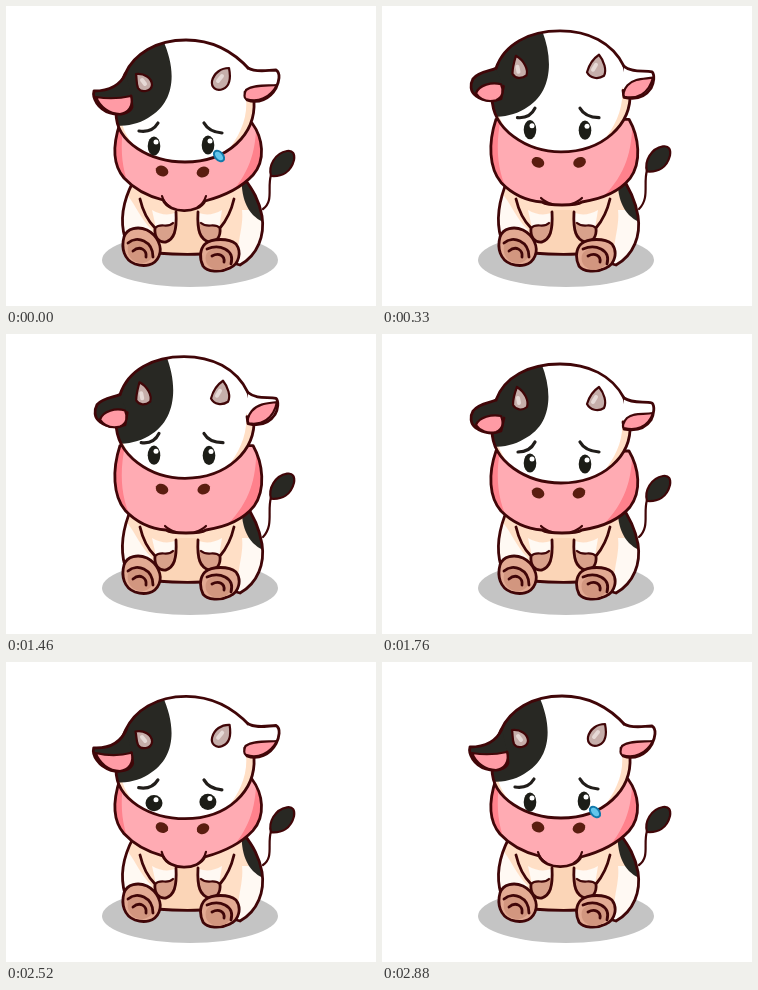
Write an HTML page that moves like this. It is 370 by 300 pixels and loops after 2.94 s.

```html
<!DOCTYPE html>
<html lang="en">
<head>
<meta charset="utf-8">
<title>Sad calf</title>
<style>
html, body { margin: 0; width: 100%; height: 100%; overflow: hidden; background: #fff; }
svg { display: block; width: 370px; height: 300px; }
.ln { stroke: #400608; stroke-width: 2.8; stroke-linecap: round; stroke-linejoin: round; }
.thin { stroke-width: 2.2; }
.no { fill: none; }
</style>
</head>
<body>
<svg viewBox="0 0 370 300">
  <defs>
    <clipPath id="headClip"><path id="headMask"/></clipPath>
    <clipPath id="snoutClip"><path id="snoutMask"/></clipPath>
    <clipPath id="bodyClip"><path id="bodyMask"/></clipPath>
  </defs>
  <ellipse cx="184" cy="254" rx="88" ry="27" fill="#c4c4c4"/>

  <path id="tail" class="ln no thin"/>
  <path id="tuft" class="ln thin" fill="#282823"/>

  <path id="body" fill="#ffdfc6"/>
  <g clip-path="url(#bodyClip)">
    <path d="M110 190H122C130 200 134 212 146 224L120 238H110Z" fill="#fff9f3"/>
    <path d="M146 204Q158 211 169 207V220L150 222Z" fill="#fff9f3"/>
    <path d="M216 204Q204 211 193 207V220L213 222Z" fill="#fff9f3"/>
    <path d="M236 204C238 222 230 234 232 262H262V204Z" fill="#fff9f3"/>
    <path d="M170 204H192V226L203 240V252H146V240L170 226Z" fill="#fbd5b7"/>
    <path d="M236 165C234 190 240 209 259 217L266 170Z" fill="#282823"/>
  </g>
  <path id="bodyLine" class="ln no"/>

  <path d="M148 222C155 216 162 223 170 215V226C169 234 161 238 155 235C150 232 148 227 148 222Z" fill="#d9a18b"/>
  <path d="M215 222C208 216 201 223 192 215V226C193 234 201 238 208 235C213 232 215 227 215 222Z" fill="#d9a18b"/>
  <g class="ln no">
    <path d="M134 193C137 206 142 215 149 222C148 231 153 237 160 236C168 233 171 225 170 206"/>
    <path d="M228 193C225 206 220 215 214 222C215 231 210 237 203 236C194 233 191 225 192 206"/>
    <path class="thin" d="M149 222C155 216 161 223 167 217M214 222C208 216 202 223 195 217"/>
  </g>

  <g class="ln">
    <path d="M118 231C121 222 132 220 141 224C151 229 157 241 153 250C149 260 138 261 129 258C118 254 115 242 118 231Z" fill="#e3aa93"/>
    <path d="M122 240C125 231 139 231 145 239C150 248 146 255 138 257C127 258 120 250 122 240Z" fill="#d2967f" stroke="none"/>
    <path class="no" d="M122 237C131 229 147 235 147 251M127 245C134 239 141 244 140 251"/>
    <path d="M199 238C206 232 223 232 230 238C236 246 233 258 224 262C214 267 201 266 197 260C193 252 194 243 199 238Z" fill="#e3aa93"/>
    <path d="M200 249C203 241 218 240 224 247C228 255 223 262 214 264C203 264 198 257 200 249Z" fill="#d2967f" stroke="none"/>
    <path class="no" d="M201 243C213 238 229 243 225 258M206 250C213 246 219 250 218 256"/>
  </g>

  <path id="snout" fill="#ffabb3"/>
  <g clip-path="url(#snoutClip)" fill="#ff818c">
    <path d="M100 100H122C112 135 114 165 128 190H100Z"/>
    <path d="M270 100H250C252 140 246 165 222 190H270Z"/>
  </g>
  <path id="snoutLine" class="ln no"/>
  <path id="mouth" class="ln no thin"/>
  <ellipse id="nose0" rx="6.5" ry="5.2" fill="#5a1d10"/>
  <ellipse id="nose1" rx="6.5" ry="5.2" fill="#5a1d10"/>

  <path id="head" fill="#fff"/>
  <g clip-path="url(#headClip)">
    <path id="shadeL" fill="#ffdfc6"/>
    <path id="shadeR" fill="#ffdfc6"/>
    <path id="patch" fill="#282823"/>
  </g>
  <path id="headLine" class="ln no"/>
  <path id="earL" class="ln" fill="#282823"/>
  <path id="innerL" class="ln thin" fill="#ff9ba5"/>
  <path id="earR" class="ln" fill="#fff"/>
  <path id="innerR" class="ln thin" fill="#ff9ba5"/>
  <path id="hornL" class="ln thin" fill="#c6aeaa"/>
  <path id="hornR" class="ln thin" fill="#c6aeaa"/>
  <path id="shine" class="no" stroke="#e6d9d6" stroke-width="4" stroke-linecap="round"/>
  <path id="brows" class="no" stroke="#211d1a" stroke-width="3.2" stroke-linecap="round"/>
  <g id="eye0"></g>
  <g id="eye1"></g>
  <g id="tear">
    <ellipse rx="4" ry="6.2" fill="#62c6ec" stroke="#1279aa" stroke-width="2" transform="rotate(-42)"/>
  </g>
</svg>
<script>
const $ = id => document.getElementById(id);
const LOOP = 2940;

// time, lift (0 low, 1 middle, 2 high), eye opening, tear drop, tear size
const STEPS = [
  [0, 0, 1, 0, 1],
  [30, .5, 1, 0, 0], [130, 1, 1, 0, 0], [230, 1.27, 1, 0, 0],
  [330, 1.53, 1, 0, 0], [430, 1.78, 1, 0, 0], [530, 2, 1, 0, 0],
  [1460, 1.78, 1, 0, 0], [1560, 1.53, 1, 0, 0], [1660, 1.27, 1, 0, 0],
  [1760, 1, 1, 0, 0], [1860, .5, 1, 0, 0], [1960, 0, 1, 0, 0],
  [2520, -.1, .84, 0, 0], [2580, -.1, .4, 0, .7], [2640, -.1, .15, 18, 1],
  [2700, -.1, .4, 40, 1], [2760, -.05, .84, 64, 1], [2820, 0, 1, -2, .7],
  [2880, 0, 1, 0, 1]
];

// each part in its low, middle and high pose
const PARTS = {
  tail: ["M257 203C268 195 261 182 265 169", "M257 203C268 193 261 179 265 166", "M257 203C268 191 261 176 265 163"],
  tuft: ["M265 170C262 160 269 147 281 145C287 144 289 148 288 154C285 166 276 171 265 170Z",
    "M265 167C262 157 269 144 281 142C287 141 289 145 288 151C285 163 276 168 265 167Z",
    "M265 164C262 154 269 141 281 139C287 138 289 142 288 148C285 160 276 165 265 164Z"],
  body: ["M127 176C117 195 114 215 119 232L150 247Q175 249 196 248L234 259C252 249 259 229 256 210C253 194 247 184 238 172Z",
    "M126 174C117 194 114 215 119 232L150 247Q175 249 196 248L234 259C252 249 259 229 256 210C253 193 247 182 238 170Z",
    "M126 172C117 193 114 215 119 232L150 247Q175 249 196 248L234 259C252 249 259 229 256 210C253 192 247 180 238 168Z"],
  snout: ["M114 117C107 138 106 158 118 172C130 185 145 191 157 194C164 208 192 208 199 195C218 190 235 182 247 169C260 154 257 132 246 117Z",
    "M114 117C106 140 107 163 119 177C132 190 147 195 160 196C166 200 194 200 200 196C220 193 237 186 248 173C260 157 257 134 247 117Z",
    "M114 110C106 135 107 161 119 176C132 190 147 195 160 196C166 200 194 200 200 196C220 193 237 186 248 172C260 155 257 128 247 110Z"],
  mouth: ["M156 190Q158 197 164 201M200 190Q198 197 192 201", "M159 192Q163 196 170 198M200 192Q196 196 189 198", "M159 192Q163 196 170 198M200 192Q196 196 189 198"],
  head: ["M110 107C110 137 145 156 179 156C222 156 250 128 248 95L244 64C228 46 208 34 180 34C150 34 128 48 119 68C114 78 110 90 110 107Z",
    "M110 96C110 128 145 149 179 149C221 149 250 122 248 90L242 64C230 41 206 30 178 30C147 30 122 43 114 66C111 75 110 86 110 96Z",
    "M110 86C110 120 145 143 179 143C221 143 250 115 248 82L242 57C230 32 206 20.5 178 20.5C147 20.5 122 34 114 59C111 68 110 78 110 86Z"],
  shadeL: ["M105 100L114 100C114 120 120 132 132 143L108 145Z", "M105 92L114 92C114 112 120 124 132 135L108 137Z", "M105 84L114 84C114 106 120 118 132 129L108 131Z"],
  shadeR: ["M252 90L240 92C242 112 234 130 220 147L252 150Z", "M252 84L240 86C242 105 234 123 220 140L252 143Z", "M252 76L240 78C242 98 234 116 220 134L252 137Z"],
  patch: ["M155 30C170 60 172 95 142 112C132 118 122 120 108 120L95 100L100 30Z",
    "M157 24C171 54 172 90 142 105C132 111 122 113 108 113L95 93L100 24Z",
    "M158 14C172 44 173 84 143 101C132 107 122 109 108 109L95 89L100 14Z"],
  earL: ["M120 67C114 80 103 85 88 85C86 92 92 103 104 107C114 110 124 107 126 101L125 90",
    "M114 66C108 69 97 69 91 77C88 82 88 90 94 94C102 100 112 100 119 97L122 84",
    "M114 59C108 62 97 62 91 69C88 75 88 82 94 86C102 92 112 92 119 89L121 77"],
  innerL: ["M90 91C102 93 116 92 125 90C128 100 122 107 114 108C103 108 94 101 90 91Z",
    "M94 91C97 83 110 80 119 82C122 89 121 95 114 98C106 100 98 97 94 91Z",
    "M94 84C97 75 110 72 119 75C122 81 121 88 114 91C105 93 98 90 94 84Z"],
  earR: ["M242 62C250 67 262 64 270 64C275 67 273 76 270 82C264 93 252 98 241 94L239 86",
    "M242 64C251 70 262 67 270 69C273 72 272 80 269 86C263 95 253 97 242 95L241 88",
    "M242 57C251 65 262 61 270 63C273 66 272 74 269 79C263 88 253 91 242 88L241 81"],
  innerR: ["M271 79C262 80 248 78 240 84C238 88 238 92 240 93C252 97 264 92 271 79Z",
    "M271 79C262 81 252 78 245 84C241 88 240 93 242 94C253 97 266 94 271 79Z",
    "M271 65C262 66 252 67 246 75C242 80 241 86 243 88C256 90 268 83 271 65Z"],
  hornL: ["M130 68C138 67 146 72 146 79C145 86 135 87 132 82C130 77 131 73 130 68Z",
    "M135 53C143 58 147 67 145 73C140 77 134 76 131 71C131 64 133 58 135 53Z",
    "M133 47C141 51 146 60 144 66C139 70 133 70 130 65C130 58 132 52 133 47Z"],
  hornR: ["M223 62C225 72 224 80 217 83C210 86 205 81 206 75C208 67 215 62 223 62Z",
    "M217 53C222 59 225 68 222 74C216 78 208 76 205 70C207 63 211 57 217 53Z",
    "M217 45C222 51 225 61 222 66C216 70 208 69 205 63C207 55 211 49 217 45Z"],
  shine: ["M136 74L139 78M216 70L212 75", "M136 64L137 69M214 63L211 68", "M135 58L136 63M214 55L211 60"],
  brows: ["M133 125Q146 127 152 117M198 117Q203 126 216 127", "M136 118Q148 118 153 108M198 108Q203 117 217 118", "M135 106Q148 108 153 97M198 97Q203 106 217 106"]
};
const SPOTS = {
  nose: [[156, 165, 197, 166], [156, 159, 197, 159], [156, 154, 198, 154]],
  eye: [[148, 140, 202, 139], [148, 129, 203, 130], [148, 119, 203, 119]]
};
const COPIES = { head: ["headMask", "headLine"], snout: ["snoutMask", "snoutLine"], body: ["bodyMask", "bodyLine"] };

const blend = (poses, k) => {
  const i = k < 1 ? 0 : 1, f = k - i;
  return poses[i].map((v, n) => v + (poses[i + 1][n] - v) * f);
};
const shapes = Object.entries(PARTS).map(([id, poses]) => ({
  nodes: [id, ...(COPIES[id] || [])].map($),
  form: poses[0].split(/[\d.]+/),
  nums: poses.map(p => p.match(/[\d.]+/g).map(Number))
}));

for (const id of ["eye0", "eye1"]) {
  $(id).innerHTML = '<ellipse fill="#1c1d17"/><circle cx="2" cy="-4" r="2.5" fill="#fff"/>';
}

function draw(t) {
  const [, k, open, fall, size] = STEPS.filter(s => s[0] <= t).pop();
  for (const { nodes, form, nums } of shapes) {
    const v = blend(nums, k);
    const d = form.map((s, i) => s + (i < v.length ? v[i].toFixed(2) : "")).join("");
    nodes.forEach(n => n.setAttribute("d", d));
  }
  const nose = blend(SPOTS.nose, k), eye = blend(SPOTS.eye, k);
  for (const i of [0, 1]) {
    const x = 2 * i, tilt = i ? -25 : 25;
    $("nose" + i).setAttribute("transform", `translate(${nose[x]} ${nose[x + 1]}) rotate(${tilt})`);
    const g = $("eye" + i), [ball, light] = g.children;
    g.setAttribute("transform", `translate(${eye[x]} ${eye[x + 1]})`);
    ball.setAttribute("rx", open < 1 ? 8.5 : 6.3);
    ball.setAttribute("ry", 9.6 * open);
    light.setAttribute("cy", -4 * open);
    light.style.display = open < .5 ? "none" : "";
  }
  $("tear").style.display = size ? "" : "none";
  $("tear").setAttribute("transform", `translate(213 ${150 + fall}) scale(${size})`);
}

const start = performance.now();
function tick() {
  draw((performance.now() - start) % LOOP);
  requestAnimationFrame(tick);
}
draw(0);
requestAnimationFrame(tick);
</script>
</body>
</html>
```
